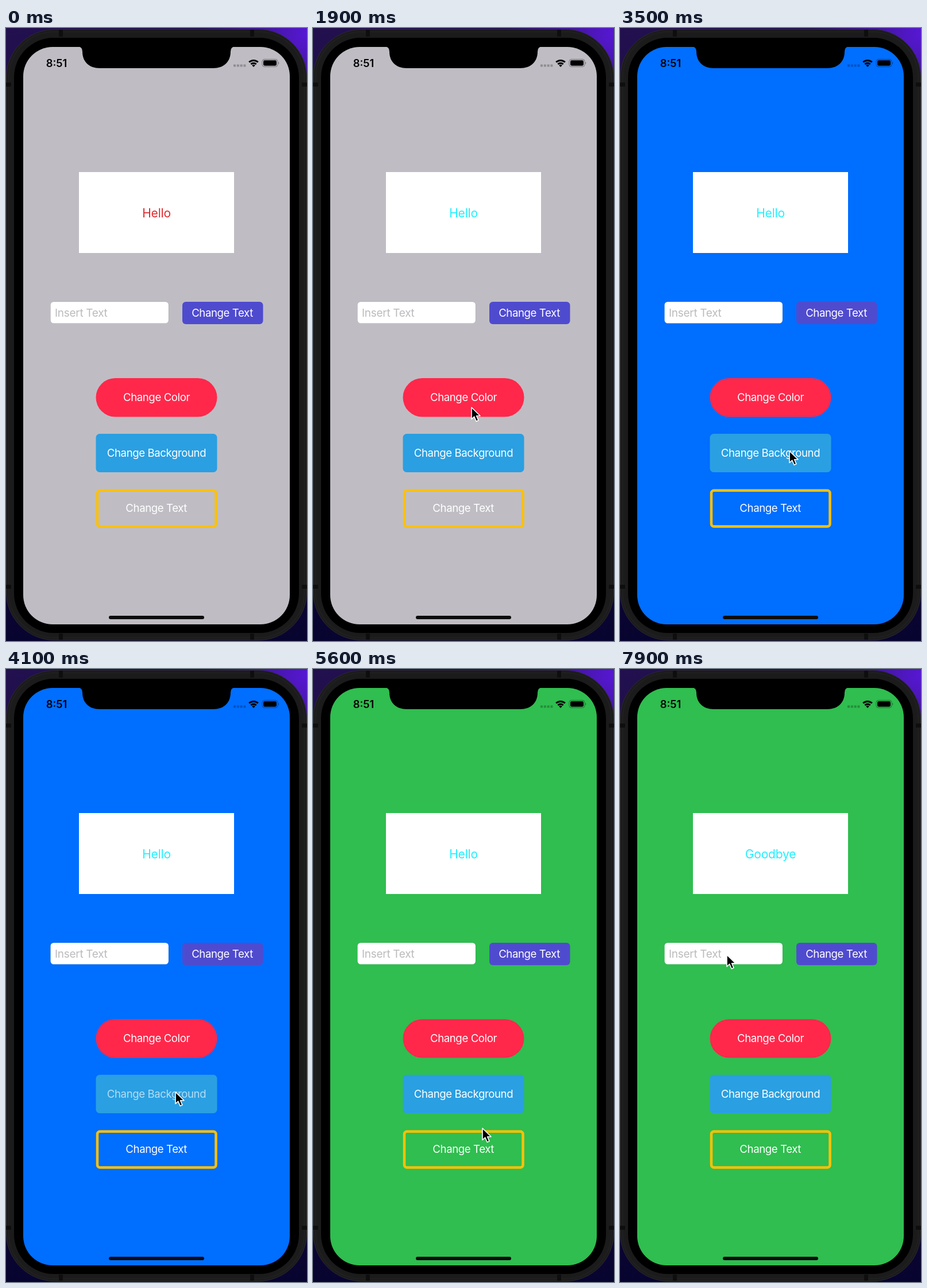
Animation of 524x1068 px, one loop 8 s. Source, as an HTML page:

```html
<!DOCTYPE html>
<html lang="en">
<head>
<meta charset="utf-8">
<title>Label playground</title>
<style>
  html, body { margin: 0; width: 100%; height: 100%; overflow: hidden; background: #07041f; }
  svg { display: block; width: 524px; height: 1068px; }
  text { font: 400 18.6px Inter, Roboto, sans-serif; letter-spacing: -.4px; fill: #fff; text-anchor: middle; }
  .clock { font-size: 18.4px; font-weight: 600; letter-spacing: 0; fill: #000; }
  .hint { font-size: 19px; letter-spacing: -.3px; fill: #bbbbbe; text-anchor: start; }
  .word { font-size: 21px; letter-spacing: -.2px; }

  .screen, .word, .label { animation: 8s step-end infinite; }
  .screen { animation-name: backdrop; }
  .hello { animation-name: tint, leave; }
  .goodbye { fill: #22efff; animation-name: arrive; }
  .press-color { animation-name: press-color; }
  .press-back { animation-name: press-back; }
  .press-text { animation-name: press-text; }
  .pointer { animation: travel 8s ease-in-out infinite; }

  @keyframes backdrop {
    0% { fill: #bfbdc3; }
    31.25% { fill: #2aa5bf; }
    41.25% { fill: #006eff; }
    52.5% { fill: #2aa5bf; }
    61.25%, 100% { fill: #2fbe4f; }
  }
  @keyframes tint {
    0% { fill: #dc2b2e; }
    16.25%, 100% { fill: #22efff; }
  }
  @keyframes leave {
    0% { opacity: 1; }
    80%, 100% { opacity: 0; }
  }
  @keyframes arrive {
    0% { opacity: 0; }
    80%, 100% { opacity: 1; }
  }
  @keyframes press-color {
    0%, 16.25%, 100% { opacity: 1; }
    14.75% { opacity: .6; }
  }
  @keyframes press-back {
    0%, 31.25%, 41.25%, 52.5%, 61.25%, 100% { opacity: 1; }
    29.75%, 39.75%, 51%, 58.75% { opacity: .65; }
  }
  @keyframes press-text {
    0%, 80%, 100% { opacity: 1; }
    78% { opacity: .6; }
  }
  @keyframes travel {
    0%, 3% { transform: translate(540px, 640px); }
    11.5%, 23.75% { transform: translate(276px, 661px); }
    28.75%, 65.625% { transform: translate(295px, 737px); }
    73.125%, 83.75% { transform: translate(295px, 835px); }
    96.25%, 100% { transform: translate(186px, 498px); }
  }
</style>
</head>
<body>
<svg viewBox="0 0 524 1068">
  <defs>
    <linearGradient id="wall" x1="0" y1="0" x2="0" y2="1">
      <stop offset="0" stop-color="#22104f"/>
      <stop offset=".5" stop-color="#150936"/>
      <stop offset="1" stop-color="#080430"/>
    </linearGradient>
    <radialGradient id="glow" gradientUnits="userSpaceOnUse" cx="524" cy="10" r="190">
      <stop offset="0" stop-color="#5718d4"/>
      <stop offset="1" stop-color="#5718d4" stop-opacity="0"/>
    </radialGradient>
  </defs>

  <rect width="524" height="1068" fill="url(#wall)"/>
  <rect width="524" height="1068" fill="url(#glow)"/>

  <!-- phone body -->
  <rect x=".5" y="2.5" width="523" height="1064" rx="84" fill="#1b1b1c" stroke="#2b2b2d"/>
  <rect x="4.5" y="6.5" width="515" height="1056" rx="80" fill="none" stroke="#202021" stroke-width="2"/>
  <path d="M92 3h7v12h-7zM425 3h7v12h-7zM92 1055h7v11h-7zM425 1055h7v11h-7zM0 95h9v7H0zM515 95h9v7h-9zM0 970h9v7H0zM515 970h9v7h-9z" fill="#0e0e0f"/>
  <rect x="14" y="17" width="496" height="1037" rx="69" fill="#000"/>

  <rect class="screen" x="30" y="33" width="464" height="1006" rx="51"/>
  <path d="M126 32.5Q133 33 133 41C133 59 145 70 163 70H361C379 70 391 59 391 41Q391 33 398 32.5Z"/>

  <!-- status bar -->
  <text class="clock" x="88" y="67.5">8:51</text>
  <path d="M396 65.5H418" stroke="#000" stroke-opacity=".25" stroke-width="4" stroke-dasharray="4 1.8"/>
  <g fill="none" stroke="#000" stroke-width="3">
    <path d="M423.2 59.5A11.3 11.3 0 0 1 438.8 59.5"/>
    <path d="M426.4 63.1A6.6 6.6 0 0 1 435.6 63.1"/>
  </g>
  <path d="M431 68L428.2 65.1A4.1 4.1 0 0 1 433.8 65.1Z"/>
  <rect x="446" y="54.5" width="27" height="13" rx="4" fill="none" stroke="#000" stroke-opacity=".4"/>
  <rect x="448" y="56.3" width="23" height="9.4" rx="2.4"/>
  <path d="M474.3 59Q476.3 61 474.3 63.2Z" fill-opacity=".45"/>

  <!-- label and field -->
  <rect x="127" y="251" width="270" height="141" fill="#fff"/>
  <text class="word hello" x="262" y="330">Hello</text>
  <text class="word goodbye" x="262" y="330">Goodbye</text>
  <rect x="77.5" y="477" width="205.5" height="37.5" rx="5.5" fill="#fff" stroke="#000" stroke-opacity=".1" stroke-width=".8"/>
  <text class="hint" x="85" y="503">Insert Text</text>
  <rect x="307" y="477" width="140.5" height="39" rx="6" fill="#4f4bcf"/>
  <text x="376.5" y="502.5">Change Text</text>

  <!-- buttons -->
  <rect x="156.5" y="610" width="211" height="67.5" rx="33.75" fill="#ff284b"/>
  <text class="label press-color" x="262" y="650">Change Color</text>
  <rect x="156.5" y="707" width="211" height="67" rx="6.5" fill="#2a9fe2"/>
  <text class="label press-back" x="262" y="747">Change Background</text>
  <rect x="159" y="805.8" width="206.5" height="62.7" rx="4.5" fill="none" stroke="#fcc107" stroke-width="4.5"/>
  <text class="label press-text" x="261.7" y="843">Change Text</text>

  <rect x="179" y="1024" width="166" height="6" rx="3" fill="#0c0c0c"/>

  <path class="pointer" d="M0 0V20.5L4.7 16.2L8.2 24.3L12 22.6L8.6 14.7H15Z" stroke="#fff" stroke-width="1.6" stroke-linejoin="round"/>
</svg>
</body>
</html>
```
